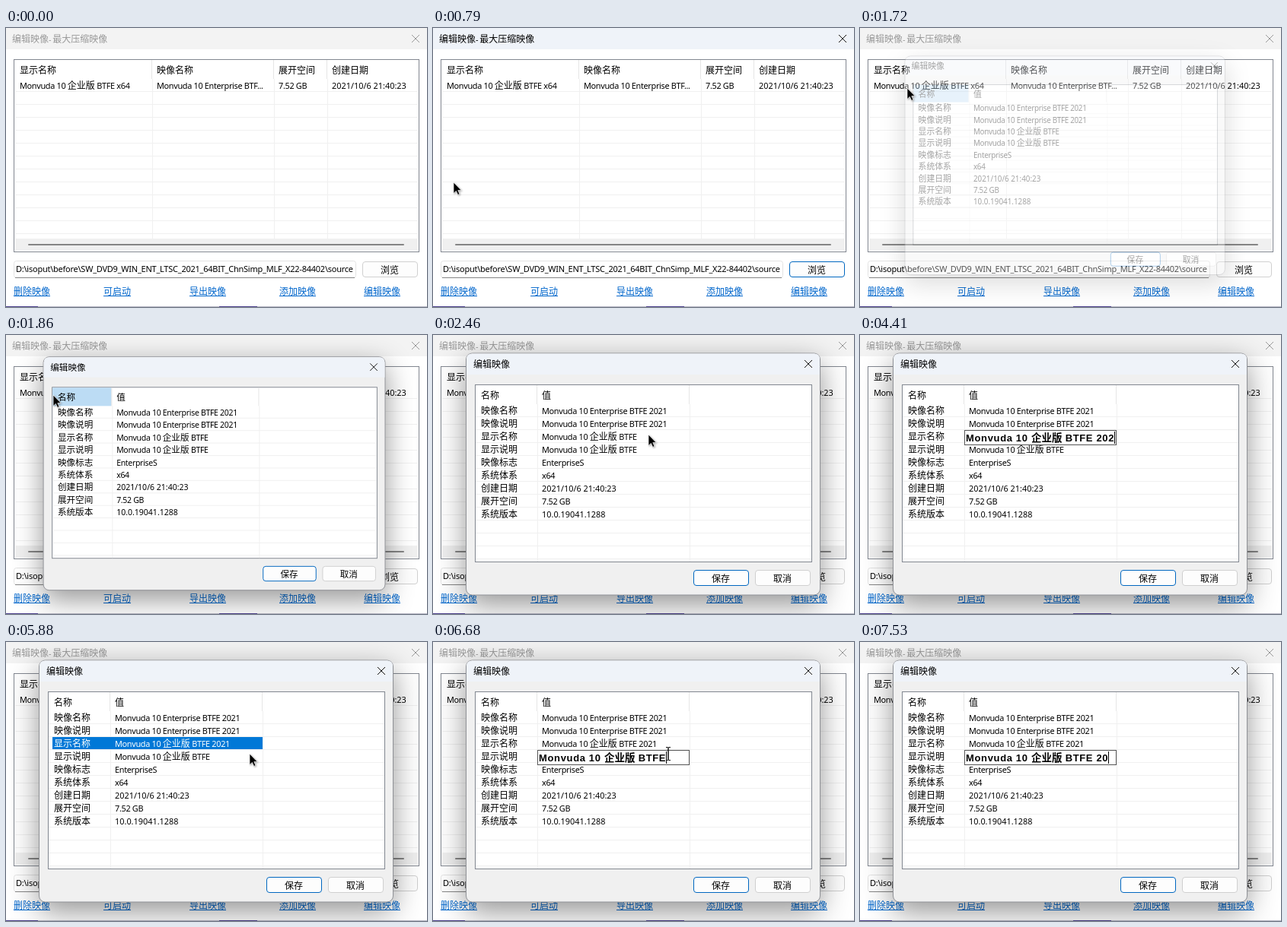
Recreate the animation shown at these times as an HTML page. Size 553 by 367 pixels, loop 7.99 s.

```html
<!DOCTYPE html>
<html lang="zh-CN">
<head>
<meta charset="utf-8">
<title>编辑映像</title>
<style>
html, body { margin: 0; width: 100%; height: 100%; overflow: hidden; background: #fff; }
svg { display: block; width: 553px; height: 367px; }
text {
  font: 10.9px "Noto Sans", "Noto Sans CJK SC", "Noto Sans CJK", sans-serif;
  letter-spacing: -.03em; white-space: pre; fill: #000;
}
.c { font-size: 12px; letter-spacing: 0; }
.num { letter-spacing: 0; }
.path { font-size: 11px; letter-spacing: -.022em; }
.mid { text-anchor: middle; }
.link { fill: #0066cc; }
.rule { stroke: #f0f0f0; }
.sep { stroke: #e5e5e5; }
.link-line { stroke: #0066cc; }
.input-line { stroke: #868686; }
.frame { fill: #fff; stroke: #828790; }
.btn { fill: #fdfdfd; stroke: #d0d0d0; }
.default .btn.main-btn { stroke: #0067c0; }
.bar { fill: #f3f3f3; }
.default > .bar { fill: #eff3f9; }
.caption text { fill: #999; letter-spacing: .15em; }
.caption path { stroke: #999; fill: none; }
.default > .caption text { fill: #000; }
.default > .caption path { stroke: #111; }
.row rect { fill: none; }
.row.sel rect { fill: #0078d7; }
.row.sel text { fill: #fff; }
#dialog { filter: drop-shadow(0 12px 19px rgba(0, 0, 0, .42)); }
#edit text {
  font: bold 13px "Liberation Sans", "Noto Sans CJK SC", "Noto Sans CJK", sans-serif;
  letter-spacing: .05em;
}
#edit .c { font-size: 13.5px; }
#edit.all text { fill: #fff; }
#arrow { filter: drop-shadow(1px 1px 1px rgba(0, 0, 0, .35)); }
</style>
</head>
<body>
<svg id="stage" viewBox="0 0 553 367"></svg>
<script>
const LOOP = 7990, STEP = 66;
const BASE = 'Monvuda 10 企业版 BTFE';
const FULL = 'Monvuda 10 Enterprise BTFE 2021';
const $ = id => document.getElementById(id);

const mix = s => s.replace(/[\u4e00-\u9fff]+/g, m => `<tspan class="c">${m}</tspan>`);
const text = (x, y, s, cls = '') => `<text x="${x}" y="${y}" class="${cls}">${mix(s)}</text>`;
const rect = (x, y, w, h, cls, extra = '') =>
  `<rect x="${x}" y="${y}" width="${w}" height="${h}" class="${cls}" ${extra}/>`;
const line = (x1, y1, x2, y2, cls) =>
  `<line x1="${x1}" y1="${y1}" x2="${x2}" y2="${y2}" class="${cls}"/>`;
const caption = (x, y, s, cx) =>
  `<g class="caption">${text(x, y + 4.5, s)}
   <path d="M${cx - 5} ${y - 5}l10 10m0 -10l-10 10"/></g>`;
const button = (x, y, s, cls = '') =>
  rect(x, y, 72, 20, 'btn ' + cls, 'rx="3.5"') + text(x + 35.5, y + 15, s, 'mid');

// Grid of a list view: row lines every 17 px, column lines below the header
function grid(left, right, top, bottom, cols, headTop) {
  let out = '';
  for (let y = top + 16.5; y < bottom; y += 17) out += line(left, y, right, y, 'rule');
  for (const x of cols)
    out += line(x, headTop, x, top, 'sep') + line(x + 1, top, x + 1, bottom, 'rule');
  return out;
}
const row = (id, x, y, w, cells) =>
  `<g class="row" id="${id}">${rect(x, y, w, 16, '')}${cells.map(c => text(c[0], y + 13, c[1], c[2])).join('')}</g>`;

function mainWindow() {
  const heads = [[18, '显示名称'], [198, '映像名称'], [358, '展开空间'], [428, '创建日期']];
  const links = [[10, '删除映像'], [128, '可启动'], [241, '导出映像'], [359, '添加映像'], [470, '编辑映像']];
  return `<g id="main">
    ${rect(0, 0, 553, 28, 'bar')}
    ${caption(8, 14, '编辑映像-最大压缩映像', 538)}
    ${rect(10.5, 41.5, 532, 253, 'frame')}
    ${grid(12, 541, 67, 277, [191.5, 351.5, 421.5], 42)}
    ${heads.map(h => text(h[0], 59.5, h[1])).join('')}
    ${row('image', 16, 67, 525, [[18, BASE + ' x64'], [198, 'Monvuda 10 Enterprise BTF...'],
      [358, '7.52 GB'], [428, '2021/10/6 21:40:23', 'num']])}
    ${rect(12, 277, 529, 16, '', 'fill="#f0f0f0"')}
    ${rect(29, 284, 494, 2, '', 'rx="1" fill="#858585"')}
    ${rect(10.5, 306.5, 449, 22, '', 'rx="3" fill="#fff" stroke="#e3e3e3"')}
    ${line(12, 328.5, 458, 328.5, 'input-line')}
    ${text(13, 320.5, 'D:\\isoput\\before\\SW_DVD9_WIN_ENT_LTSC_2021_64BIT_ChnSimp_MLF_X22-84402\\source', 'path')}
    ${button(468.5, 307.5, '浏览', 'main-btn')}
    ${links.map(([x, s]) => text(x, 350.5, s, 'link') +
      line(x, 352.5, x + 12 * s.length, 352.5, 'link-line')).join('')}
    <path d="M0 366.500H553" stroke="#b9b9c6"/>
    <path d="M0 366.500H42M280 366.500H330" stroke="#4b3f8c"/>
  </g>`;
}

function dialogWindow() {
  const rows = [['映像名称', FULL], ['映像说明', FULL], ['显示名称', BASE], ['显示说明', BASE],
    ['映像标志', 'EnterpriseS'], ['系统体系', 'x64'], ['创建日期', '2021/10/6 21:40:23', 'num'],
    ['展开空间', '7.52 GB'], ['系统版本', '10.0.19041.1288', 'num']];
  return `<g id="dialog" class="default">
    ${rect(43.5, 24, 465, 318, '', 'rx="8" fill="#f0f0f0" stroke="#8f9196"')}
    <path class="bar" d="M44 52V32Q44 24.500 51.500 24.500H500.500Q508 24.500 508 32V52Z"/>
    ${caption(53, 38, '编辑映像', 493)}
    ${rect(55.5, 65.5, 442, 233, 'frame')}
    ${rect(56, 66, 80, 25, '', 'id="hover" fill="#bcdcf4"')}
    ${grid(56, 497, 91, 298, [136.5, 336.5], 66)}
    ${text(63, 83.5, '名称')}${text(143, 83.5, '值')}
    ${rows.map((r, i) => row('row' + i, 61, 91 + 17 * i, 276, [[63, r[0]], [143, r[1], r[2]]])).join('')}
    ${button(342.5, 309.5, '保存', 'main-btn')}
    ${button(423.5, 309.5, '取消')}
    <g id="edit">
      ${rect(137.5, 125.5, 199, 19, '', 'fill="#fff" stroke="#555"')}
      ${rect(139, 127, 0, 16, '', 'id="mark" fill="#0078d7"')}
      <g clip-path="url(#field)"><text id="typed" y="140"></text></g>
      ${rect(0, 127, 1, 16, '', 'id="caret"')}
    </g>
  </g>`;
}

$('stage').innerHTML = `<clipPath id="field"><rect x="138" y="126" width="198" height="18"/></clipPath>
  ${mainWindow()}${dialogWindow()}
  <path id="arrow" d="M0 0V14.500L3.400 11.400L5.700 16.400L8 15.400L5.800 10.600H10.200Z" stroke="#fff" stroke-width=".7"/>
  <path id="beam" d="M-3 -8.500H-1Q0 -8.500 0 -7.500V7.500Q0 8.500 -1 8.500H-3M3 -8.500H1Q0 -8.500 0 -7.500V7.500Q0 8.500 1 8.500H3"
    fill="none" stroke="#111"/>`;

// Pointer path: time, x, y
const POINTS = [[390, 258, 286], [520, 21, 209], [660, 21, 209], [790, 27, 203], [1120, 62, 79],
  [1990, 62, 79], [2460, 283, 131], [2924, 283, 131], [3330, 328, 137], [3750, 328, 137],
  [5200, 329, 139], [5544, 329, 139], [5740, 320, 147], [6284, 320, 147], [6350, 309, 147]];
// Typed tails: start time, text
const NAME_KEYS = [[2660, ''], [3750, ' '], [4080, ' 2'], [4280, ' 20'], [4410, ' 202'], [4950, ' 2021']];
const NOTE_KEYS = [[6150, ''], [7270, ' '], [7400, ' 2'], [7530, ' 20']];

const within = (t, ...spans) => spans.some(([a, b]) => t >= a && t < b);
const show = (id, on) => { $(id).style.display = on ? '' : 'none'; };
const last = (keys, t) => keys.filter(k => k[0] <= t).pop();

function pointer(t) {
  const i = POINTS.findIndex(p => p[0] > t);
  if (i === 0) return POINTS[0].slice(1);
  if (i < 0) return POINTS[POINTS.length - 1].slice(1);
  const [a, b] = [POINTS[i - 1], POINTS[i]];
  const n = Math.max(1, Math.round((b[0] - a[0]) / STEP));
  const p = Math.min(1, Math.floor((t - a[0]) / STEP) / n);
  const e = p * p * (3 - 2 * p);
  return [1, 2].map(k => a[k] + (b[k] - a[k]) * e);
}

function drawDialog(t) {
  show('dialog', t >= 1720);
  const k = Math.min(1, Math.floor((t - 1720) / STEP) * STEP / 330);
  const s = 1 - .096 * (1 - k) ** 2;
  $('dialog').setAttribute('transform', `translate(205 160) scale(${s}) translate(-205 -160)`);
  $('dialog').style.opacity = Math.max(0, Math.min(1, .35 + k * 2));
}

function drawEdit(t) {
  const first = t < 5210;
  const open = within(t, [2660, 5210], [6150, LOOP]);
  show('edit', open);
  if (!open) return;
  const all = within(t, [2660, 3330], [6150, 6680]);
  const typed = $('typed'), value = BASE + last(first ? NAME_KEYS : NOTE_KEYS, t)[1];
  if (typed.dataset.value !== value) {
    typed.innerHTML = mix(value);
    typed.dataset.value = value;
  }
  const w = typed.getComputedTextLength();
  const x = Math.min(139, 335 - w);
  typed.setAttribute('x', x);
  $('mark').setAttribute('width', all ? w : 0);
  $('caret').setAttribute('x', Math.round(x + w));
  show('caret', !all);
  $('edit').setAttribute('class', all ? 'all' : '');
  $('edit').setAttribute('transform', `translate(0 ${first ? 0 : 17})`);
}

const nameCell = $('row2').querySelectorAll('text')[1];
function draw(now) {
  const t = now % LOOP;
  $('main').setAttribute('class', within(t, [660, 1720]) ? 'default' : '');
  $('image').classList.toggle('sel', within(t, [1390, 1720]));
  $('row2').classList.toggle('sel', within(t, [2520, 2660], [5210, 6010]));
  $('row3').classList.toggle('sel', within(t, [6010, 6150]));
  nameCell.innerHTML = mix(BASE + (t < 5210 ? '' : ' 2021'));
  show('hover', t < 2120);
  drawDialog(t);
  drawEdit(t);
  const at = `translate(${pointer(t).map(Math.round).join(' ')})`;
  $('arrow').setAttribute('transform', at);
  $('beam').setAttribute('transform', at);
  show('arrow', within(t, [390, 2660], [5210, 6150]));
  show('beam', within(t, [2660, 3750], [6150, 7270]));
}

const start = performance.now();
(function tick() {
  draw(performance.now() - start);
  requestAnimationFrame(tick);
})();
</script>
</body>
</html>
```
